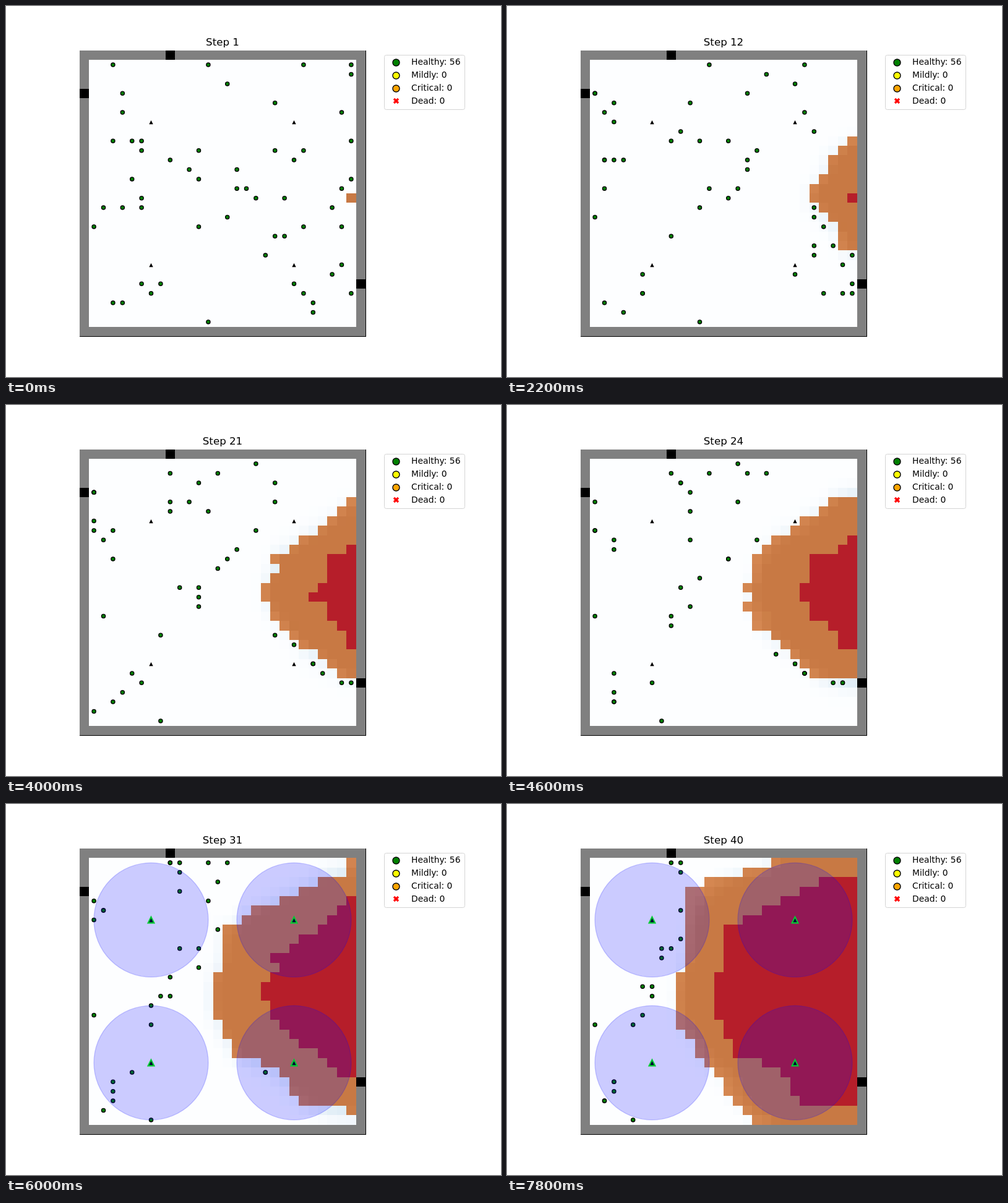
An HTML page with a canvas for the animation above (8 s loop, 800x600 px).

```html
<!DOCTYPE html>
<html lang="en">
<head>
<meta charset="utf-8">
<title>Evacuation</title>
<style>
html, body { margin: 0; width: 100%; height: 100%; overflow: hidden; background: #fff; }
canvas, svg { position: absolute; left: 0; top: 0; }
text { font: 13.89px "DejaVu Sans", sans-serif; }
#title { font-size: 16.67px; text-anchor: middle; }
</style>
</head>
<body>
<canvas id="stage" width="800" height="600"></canvas>
<svg width="800" height="600">
  <text id="title" x="350" y="64">Step 1</text>
  <rect x="611.5" y="79.5" width="130" height="88" rx="3" fill="#fff" stroke="#d4d4d4"/>
  <g stroke="#000" stroke-width="1.4">
    <circle cx="630.5" cy="91.5" r="5.5" fill="green"/>
    <circle cx="630.5" cy="112.5" r="5.5" fill="yellow"/>
    <circle cx="630.5" cy="133.5" r="5.5" fill="orange"/>
  </g>
  <path d="M627 150l7 7m0-7l-7 7" stroke="red" stroke-width="3.3"/>
  <text x="655" y="95">Healthy: 56</text>
  <text x="655" y="116">Mildly: 0</text>
  <text x="655" y="137">Critical: 0</text>
  <text x="655" y="158">Dead: 0</text>
</svg>
<script>
const SIZE = 30, CELL = 15.4, LEFT = 119, TOP = 72;
const STEPS = 40, STEP_MS = 200, BURN_STEPS = 10, SPRINKLER_STEP = 25;
const STAYING = 20;
const EXITS = [[9, 0], [0, 4], [29, 24]];

// Outline of the fire's left side: step, then row, column corners.
const FRONTS = [
  [6, 14, 27, 15, 26, 16, 28],
  [17, 9, 27, 11, 22, 14, 21, 17, 22, 18, 24, 20, 25],
  [24, 5, 26, 9, 20, 11, 18, 16, 17, 19, 19, 20, 21, 23, 24],
  [30, 3, 25, 8, 15, 16, 14, 21, 16, 23, 21, 26, 23],
  [35, 1, 24, 3, 23, 5, 18, 6, 14, 16, 12, 19, 15, 27, 21],
  [40, 1, 20, 3, 13, 4, 11, 18, 10, 22, 13, 26, 16, 28, 18]
];
// Columns of the people in each row at the start.
const CROWD_ROWS = [[], [3, 13, 23, 28], [28], [15], [4], [20], [4, 27], [], [], [3, 5, 6, 28],
  [6, 12, 20, 23], [9, 22], [11, 16], [5, 12, 28], [16, 17, 27], [6, 18, 21], [2, 4, 6, 26], [15],
  [1, 12, 23, 27], [20, 21], [], [19], [27], [26], [6, 8, 22], [7, 23, 28], [3, 4, 24], [24], [13]];

const ctx = document.getElementById("stage").getContext("2d");
const title = document.getElementById("title");
const edgeX = c => Math.round(LEFT + c * CELL);
const edgeY = r => Math.round(TOP + r * CELL);
const centerX = c => LEFT + (c + 0.5) * CELL;
const centerY = r => TOP + (r + 0.5) * CELL;
const clampCell = v => Math.max(1, Math.min(SIZE - 2, Math.round(v)));
const distance = (a, b) => Math.hypot(a[0] - b[0], a[1] - b[1]);
const random = seed => Math.abs(Math.sin(seed * 12.9898) * 43758.5453) % 1;

function eachCell(visit) {
  for (let r = 1; r < SIZE - 1; r++) for (let c = 1; c < SIZE - 1; c++) visit(c, r, r * SIZE + c);
}

function frontEdge(corners, row) {
  for (let i = 0; i + 3 < corners.length; i += 2) {
    const [r0, c0, r1, c1] = corners.slice(i, i + 4);
    if (row >= r0 && row <= r1) return Math.round(c0 + (c1 - c0) * (row - r0) / (r1 - r0));
  }
  return SIZE - 1;
}

function ignitionSteps() {
  const ignition = new Array(SIZE * SIZE).fill(Infinity);
  eachCell((c, r, i) => {
    let before = 0, edgeBefore = SIZE - 1;
    for (const [step, ...corners] of FRONTS) {
      const edge = frontEdge(corners, r);
      if (c >= edge) {
        const late = before > 0 && random(i) < 0.1 ? 1 : 0;
        ignition[i] = before + Math.ceil((edgeBefore - c) / (edgeBefore - edge) * (step - before)) + late;
        break;
      }
      before = step;
      edgeBefore = edge;
    }
  });
  ignition[15 * SIZE + 28] = 1;
  return ignition;
}

// Smoke rises from burning cells and blurs outwards once per step.
function smokeHistory(ignition) {
  let smoke = ignition.map(t => t <= 1 ? 1 : 0);
  const history = [null, smoke];
  for (let step = 2; step <= STEPS; step++) {
    const next = smoke.slice();
    eachCell((c, r, i) => {
      let sum = 0;
      for (let dy = -1; dy < 2; dy++)
        for (let dx = -1; dx < 2; dx++) sum += smoke[clampCell(r + dy) * SIZE + clampCell(c + dx)];
      const spread = smoke[i] * 0.35 + sum / 9 * 0.65;
      next[i] = ignition[i] <= step ? Math.min(1, spread + 0.35) : spread;
    });
    history.push(smoke = next);
  }
  return history;
}

// People near a door leave one after another; the others drift to the left.
function planWalks() {
  const people = CROWD_ROWS.flatMap((columns, r) => columns.map(c => {
    const from = [c, r];
    const door = EXITS.reduce((a, b) => distance(from, a) <= distance(from, b) ? a : b);
    return { from, door, way: distance(from, door) };
  }));
  const leaving = people.length - STAYING;
  return people.sort((a, b) => a.way - b.way).map(({ from, door }, i) => {
    const leaves = i < leaving;
    return {
      from, leaves,
      to: leaves ? door : [1 + (from[0] - 1) * 0.35, from[1]],
      end: leaves ? 1 + (STEPS - 1) * ((i + 1) / leaving) ** 0.75 : STEPS
    };
  });
}

const ignition = ignitionSteps();
const smoke = smokeHistory(ignition);
const walks = planWalks();

function fillCell(c, r, color, alpha = 1) {
  ctx.globalAlpha = alpha;
  ctx.fillStyle = color;
  ctx.fillRect(edgeX(c), edgeY(r), edgeX(c + 1) - edgeX(c), edgeY(r + 1) - edgeY(r));
  ctx.globalAlpha = 1;
}

function drawRoom() {
  ctx.fillStyle = "#000";
  ctx.fillRect(LEFT, TOP, 463, 463);
  ctx.fillStyle = "#808080";
  ctx.fillRect(LEFT, TOP, 462, 462);
  EXITS.forEach(([c, r]) => fillCell(c, r, "#000"));
}

function drawFire(step) {
  eachCell((c, r, i) => {
    const age = step - ignition[i];
    if (age >= BURN_STEPS) return fillCell(c, r, "#b61e2a");
    fillCell(c, r, age >= 0 ? "#de925c" : "#fdfeff");
    fillCell(c, r, age >= 0 ? "#c87944" : "#bed8ec", smoke[step][i]);
  });
}

function eachSprinkler(visit) {
  for (const r of [7, 22]) for (const c of [7, 22]) visit(centerX(c), centerY(r));
}

function drawTriangle(x, y, stroke) {
  ctx.beginPath();
  ctx.moveTo(x, y - 4.9);
  ctx.lineTo(x + 4.9, y + 4.9);
  ctx.lineTo(x - 4.9, y + 4.9);
  ctx.closePath();
  ctx.fillStyle = "#000";
  ctx.strokeStyle = stroke;
  ctx.lineWidth = 2.08;
  ctx.fill();
  ctx.stroke();
}

function drawDisc(x, y, radius, fill, stroke, width) {
  ctx.beginPath();
  ctx.arc(x, y, radius, 0, Math.PI * 2);
  ctx.fillStyle = fill;
  ctx.strokeStyle = stroke;
  ctx.lineWidth = width;
  ctx.fill();
  ctx.stroke();
}

function drawPeople(step) {
  walks.forEach(({ from, to, end, leaves }, i) => {
    if (leaves && step >= end) return;
    const p = (step - 1) / (end - 1);
    const sway = 1.4 * Math.sin(Math.PI * p);
    let c = clampCell(from[0] + (to[0] - from[0]) * p + sway * Math.sin(step * 0.9 + i * 2.4));
    const r = clampCell(from[1] + (to[1] - from[1]) * p + sway * Math.cos(step * 0.7 + i * 1.7));
    while (c > 1 && ignition[r * SIZE + c] <= step + 1 && step > 1) c--;
    drawDisc(centerX(c), centerY(r), 3.1, "#008000", "#000", 1.3);
  });
}

function draw(step) {
  const active = step >= SPRINKLER_STEP;
  title.textContent = "Step " + step;
  ctx.clearRect(0, 0, 800, 600);
  drawRoom();
  drawFire(step);
  eachSprinkler((x, y) => drawTriangle(x, y, active ? "#0f0" : "#fff"));
  drawPeople(step);
  if (active)
    eachSprinkler((x, y) => drawDisc(x, y, 6 * CELL, "rgba(0,0,255,.2)", "rgba(0,0,255,.2)", 1.39));
}

const startTime = performance.now();
let shown = 0;
function tick() {
  const step = Math.floor((performance.now() - startTime) / STEP_MS) % STEPS + 1;
  if (step !== shown) draw(shown = step);
  requestAnimationFrame(tick);
}
tick();
</script>
</body>
</html>
```
